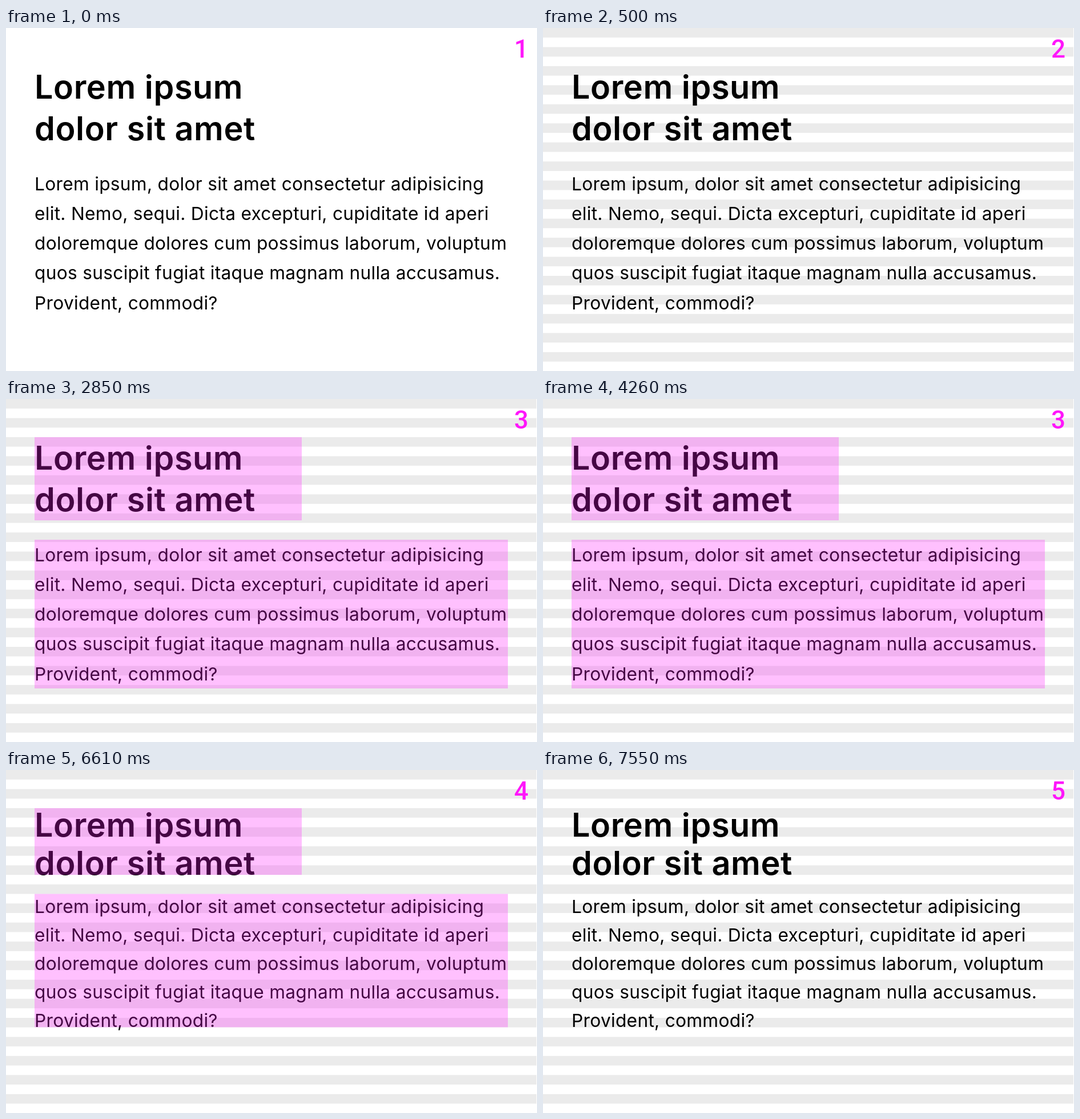
Animation, 930 px wide and 602 px high, one loop 8000 ms. Source, as an HTML page:

```html
<!DOCTYPE html>
<html lang="en">
<head>
<meta charset="utf-8">
<title>Baseline grid</title>
<style>
  html, body { margin: 0; width: 100%; height: 100%; overflow: hidden; background: #fff; }
  svg { display: block; width: 930px; height: 602px; }
  text { font-family: Inter, sans-serif; font-optical-sizing: none; white-space: pre; }
  #title { font-size: 57.5px; font-weight: 600; letter-spacing: .01em; }
  #body { font-size: 31.7px; letter-spacing: .009em; }
  #step { font: 500 44px Roboto, sans-serif; font-stretch: 85%; fill: #ff16fb; text-anchor: middle; }
  #boxes { fill: #ff16fb; fill-opacity: .27; }
</style>
</head>
<body>
<svg viewBox="0 0 930 602">
  <defs>
    <pattern id="stripes" width="930" height="33.46" patternUnits="userSpaceOnUse">
      <rect width="930" height="16.73" fill="#ebebeb"/>
    </pattern>
  </defs>
  <rect id="grid" width="929" height="602" fill="url(#stripes)"/>
  <g id="title"></g>
  <g id="body"></g>
  <g id="boxes">
    <rect id="titleBox" x="50" width="468"/>
    <rect id="bodyBox" x="50" width="829"/>
  </g>
  <text id="step" x="902.5" y="51.7"></text>
</svg>
<script>
const LOOP = 8000;
const STARTS = [0, 500, 2850, 5200, 7550];
const LINES = {
  title: ["Lorem ipsum", "dolor sit amet"],
  body: [
    "Lorem ipsum, dolor sit amet consectetur adipisicing",
    "elit. Nemo, sequi. Dicta excepturi, cupiditate id aperi",
    "doloremque dolores cum possimus laborum, voluptum",
    "quos suscipit fugiat itaque magnam nulla accusamus.",
    "Provident, commodi?"
  ]
};
// Each block: first baseline, line height; each box: top, height.
const LOOSE = { title: [124, 73.2], body: [284.6, 52.25], titleBox: [67, 146], bodyBox: [247, 261] };
const SNAPPED = { title: [117, 66.9], body: [250.6, 50.2], titleBox: [67, 117], bodyBox: [217.5, 234] };

const el = id => document.getElementById(id);
const show = (id, on) => el(id).style.display = on ? "" : "none";

for (const id in LINES) {
  for (const line of LINES[id]) {
    const text = document.createElementNS("http://www.w3.org/2000/svg", "text");
    text.setAttribute("x", 50);
    text.textContent = line;
    el(id).append(text);
  }
}

function render(step) {
  const layout = step < 3 ? LOOSE : SNAPPED;
  for (const id in LINES) {
    const [first, leading] = layout[id];
    [...el(id).children].forEach((text, i) => text.setAttribute("y", first + i * leading));
  }
  for (const id of ["titleBox", "bodyBox"]) {
    const [top, height] = layout[id];
    el(id).setAttribute("y", top);
    el(id).setAttribute("height", height);
  }
  show("grid", step > 0);
  show("boxes", step === 2 || step === 3);
  el("step").textContent = step + 1;
}

let current = -1;
const origin = performance.now();
function tick() {
  const time = (performance.now() - origin) % LOOP;
  const step = STARTS.filter(start => start <= time).length - 1;
  if (step !== current) render(current = step);
  requestAnimationFrame(tick);
}
tick();
</script>
</body>
</html>
```
